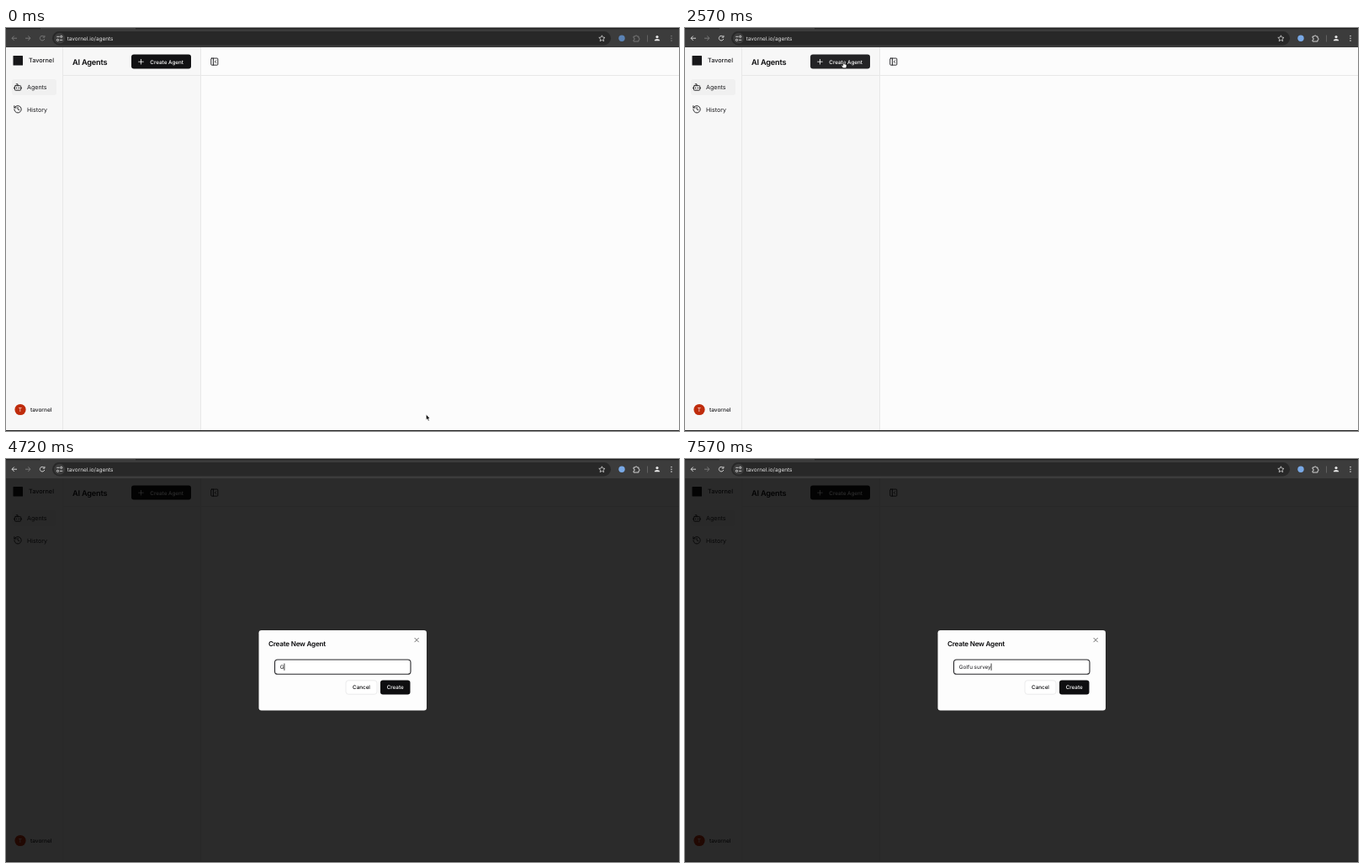
Animation, 800 px wide and 480 px high, one loop 8000 ms. Source, as an HTML page:

```html
<!DOCTYPE html>
<html lang="en">
<head>
<meta charset="utf-8">
<title>Create agent</title>
<style>
  html, body { margin: 0; width: 100%; height: 100%; overflow: hidden; background: #222; }
  svg { display: block; width: 800px; height: 480px; }
  text { font-family: Inter, sans-serif; text-rendering: geometricPrecision; white-space: pre; }
  .icon { fill: none; stroke-width: 2; stroke-linecap: round; stroke-linejoin: round; }
  .ink { stroke: #18181b; }
  .small { font-size: 6.3px; }
  .nav { font-size: 7.1px; fill: #18181b; }
  .medium { font-weight: 500; }
  .semi { font-weight: 600; }
  .tool { --c: #777; }
  .tool.active { --c: #d2d2d2; }
  .tool .line { fill: none; stroke: var(--c); stroke-width: 1; }
  .tool .solid { fill: var(--c); }
</style>
</head>
<body>
<svg viewBox="0 0 800 480">
  <!-- page -->
  <rect y="23" width="800" height="456" fill="#fcfcfc"/>
  <rect y="23" width="231" height="456" fill="#f7f7f7"/>
  <path d="M67.5 23V479M231.5 23V479M68 56.5H800" stroke="#e8e8e8" fill="none"/>

  <rect x="8.5" y="33" width="11.5" height="11.5" rx=".5" fill="#18181a"/>
  <text x="27" y="41.3" class="medium" font-size="7.25" fill="#18181b">Tavornel</text>
  <rect x="7" y="61" width="53" height="19" rx="3" fill="#f0f0f0"/>
  <g class="icon ink" transform="translate(8.5 65) scale(.46)">
    <path d="M12 8V4H8M2 14h2M20 14h2M15 13v2M9 13v2"/>
    <rect x="4" y="8" width="16" height="12" rx="2"/>
  </g>
  <text x="25" y="73.4" class="nav">Agents</text>
  <path class="icon ink" transform="translate(8.5 91.3) scale(.46)"
        d="M3 12a9 9 0 1 0 9-9 9.75 9.75 0 0 0-6.74 2.74L3 8M3 3v5h5M12 7v5l4 2"/>
  <text x="25" y="99.6" class="nav">History</text>
  <circle cx="17" cy="454.5" r="6.6" fill="#bf2c0c"/>
  <text x="17" y="456.9" text-anchor="middle" font-size="6.6" fill="#fff">T</text>
  <text x="29" y="456.8" class="medium" font-size="6.5" fill="#18181b">tavornel</text>

  <text x="79" y="43.8" class="semi" font-size="9.2" letter-spacing="-.2" fill="#09090b">AI Agents</text>
  <rect id="newButton" x="149" y="31.5" width="71" height="17" rx="3"/>
  <path class="icon" stroke="#fff" transform="translate(155.7 35.4) scale(.4)" d="M5 12h14M12 5v14"/>
  <text x="171.3" y="42.5" class="small medium" fill="#fff">Create Agent</text>
  <g class="icon ink" transform="translate(242.4 34.7) scale(.45)">
    <rect x="3" y="3" width="18" height="18" rx="2"/>
    <path d="M9 3v18M16 15l-3-3 3-3"/>
  </g>

  <rect id="overlay" y="23" width="800" height="456"/>

  <!-- browser toolbar -->
  <rect width="800" height="23" fill="#3c3c3c"/>
  <path d="M0 0H41V1.3H0ZM154 0H800V1.3H154Z" fill="#202121"/>
  <rect x="55" y="4" width="664" height="16.4" rx="8.2" fill="#282828"/>
  <circle cx="63.6" cy="12.2" r="6.4" fill="#3c3c3c"/>
  <g fill="none" stroke="#ddd" stroke-width=".9">
    <path d="M60.3 10.3h3.2M64 14.3h3.2"/>
    <circle cx="65.7" cy="10.3" r="1.1"/><circle cx="61.5" cy="14.3" r="1.1"/>
  </g>
  <text x="72.7" y="14.6" font-size="6.45" fill="#e4e4e4">tavornel.io/agents</text>
  <path d="M708.4 8.8l1.1 2.3 2.5.3-1.9 1.7.5 2.5-2.2-1.2-2.2 1.2.5-2.5-1.9-1.7 2.5-.3Z"
        fill="none" stroke="#d8d8d8" stroke-width=".8"/>
  <path d="M23 12.2h6M26.3 9.5l2.7 2.7-2.7 2.7" fill="none" stroke="#777"/>
  <g id="tools" class="tool">
    <path class="line" d="M13 12.2H7M9.7 9.5L7 12.2l2.7 2.7"/>
    <path class="line" d="M45.4 10.5A2.8 2.8 0 1 0 45.8 13M45.9 8.9v2.2h-2.2"/>
    <path class="line" d="M746 10h2a1.1 1.1 0 0 1 2.2 0h1.8v2a1.1 1.1 0 0 1 0 2.2v1.8h-6v-1.7a1.2 1.2 0 0 0 0-2.5Z"/>
    <g class="solid"><circle cx="791" cy="9.5" r=".8"/><circle cx="791" cy="12.3" r=".8"/><circle cx="791" cy="15.1" r=".8"/></g>
  </g>
  <circle id="extension" cx="732" cy="12.3" r="3.7"/>
  <path d="M762.5 8.5v8" stroke="#626262"/>
  <g fill="#e8e8e8"><circle cx="774" cy="10.6" r="1.6"/><path d="M770.9 15.3v-.7q.4-1.6 3.1-1.6t3.1 1.6v.7Z"/></g>

  <!-- dialog -->
  <g id="dialog">
    <rect x="300.5" y="204" width="199.5" height="95.5" rx="3.2" fill="#fdfdfd"/>
    <text x="312" y="222.8" class="semi" font-size="8.1" letter-spacing="-.2" fill="#09090b">Create New Agent</text>
    <path class="icon" stroke="#444" transform="translate(483.6 211) scale(.38)" d="M18 6L6 18M6 6l12 12"/>
    <rect x="319.5" y="239" width="161.5" height="17.3" rx="3.4" fill="#fff" stroke="#27272a" stroke-width="1.1"/>
    <text id="field" x="325.8" y="250" class="small"> </text>
    <rect id="caret" y="243.5" width=".8" height="8.3" fill="#111"/>
    <rect x="404" y="263.8" width="37" height="16.4" rx="3" fill="#fff" stroke="#e6e6e8" stroke-width=".8"/>
    <text x="422.5" y="274.3" text-anchor="middle" class="small medium" fill="#09090b">Cancel</text>
    <rect x="445" y="263.5" width="35.5" height="17" rx="3" fill="#0e0e10"/>
    <text x="462.7" y="274.3" text-anchor="middle" class="small medium" fill="#fff">Create</text>
  </g>

  <!-- pointer shapes, hot spot at the origin -->
  <g id="pointer">
    <path id="arrow" d="M0 0V6.6L1.5 5.3L2.6 7.8L3.8 7.3L2.7 4.8H4.6Z" fill="#000" stroke="#fff" stroke-width=".6"/>
    <path id="hand" d="M-.6 .2Q0-.4 .6 .2V3Q2 2.6 2.4 3.4Q3.8 3.2 3.8 4.4V6Q3.6 7.8 2.6 8H-.4Q-1.2 7.2-2.6 5Q-2.2 4-.6 5Z"
          fill="#fff" stroke="#000" stroke-width=".6"/>
    <path id="beam" d="M-1.6-3.6Q0-3.6 0-2.6Q0-3.6 1.6-3.6M0-2.6V2.8M-1.6 3.8Q0 3.8 0 2.8Q0 3.8 1.6 3.8M-.8 1h1.6"
          fill="none" stroke="#111" stroke-width=".9"/>
  </g>
</svg>
<script>
const LOOP = 8000, WINDOW_ACTIVE = 1290, HOVER = 1430, OPEN = 2720, SETTLED = 2860;
const AGENT_NAME = 'Golfu survey';

// [time, shape, x, y]
const pointerSteps = [
  [0, 'arrow', 499.4, 460.2], [290, 'arrow', 390, 305], [430, 'arrow', 238.5, 91.5],
  [720, 'arrow', 222, 74], [860, 'arrow', 199, 50], [1000, 'arrow', 188.3, 40.2],
  [HOVER, 'hand', 188.3, 39.8], [OPEN, 'arrow', 188.3, 39.8],
  [3150, 'arrow', 199, 52], [3290, 'arrow', 248, 110], [3430, 'arrow', 315, 190],
  [3570, 'arrow', 352, 234], [3720, 'beam', 364, 249.8], [4720, 'none', 0, 0]
];
// [time, letters typed, caret visible]
const typingSteps = [
  [0, 0, true], [3150, 0, false], [3720, 0, true], [4150, 0, false],
  [4720, 1, true], [5000, 2, true], [5150, 3, true], [5430, 4, true],
  [5720, 5, true], [5860, 6, true], [6290, 6, false], [6430, 7, true],
  [6570, 8, true], [6860, 9, true], [7150, 11, true], [7570, 12, true]
];

const el = id => document.getElementById(id);
const show = (id, visible) => el(id).setAttribute('visibility', visible ? 'visible' : 'hidden');
const stepAt = (steps, t) => steps.findLast(([start]) => start <= t);

function drawPointer(t) {
  const [, shape, x, y] = stepAt(pointerSteps, t);
  for (const id of ['arrow', 'hand', 'beam']) show(id, id === shape);
  el('pointer').setAttribute('transform', `translate(${x} ${y})`);
}

function drawField(t) {
  const [, count, caretOn] = stepAt(typingSteps, t);
  const field = el('field');
  field.textContent = AGENT_NAME.slice(0, count);
  const caretX = 325.8 + (count ? field.getComputedTextLength() : 0);
  el('caret').setAttribute('x', caretX);
  el('caret').setAttribute('opacity', caretOn ? 1 : 0);
  field.setAttribute('fill', count ? '#18181b' : '#71717a');
  if (!count) field.textContent = 'Agent Name';
}

function draw(t) {
  const active = t >= WINDOW_ACTIVE, open = t >= OPEN, settled = t >= SETTLED;
  el('tools').classList.toggle('active', active);
  el('extension').setAttribute('fill', active ? '#79a9e6' : '#5b83b5');
  el('newButton').setAttribute('fill', t >= HOVER && !open ? '#232325' : '#111113');
  el('overlay').setAttribute('opacity', !open ? 0 : settled ? .828 : .818);
  el('dialog').setAttribute('opacity', settled ? 1 : .97);
  el('dialog').setAttribute('display', open ? 'inline' : 'none');
  if (open) drawField(t);
  drawPointer(t);
}

const startTime = performance.now();
function tick() {
  draw((performance.now() - startTime) % LOOP);
  requestAnimationFrame(tick);
}
tick();
</script>
</body>
</html>
```
